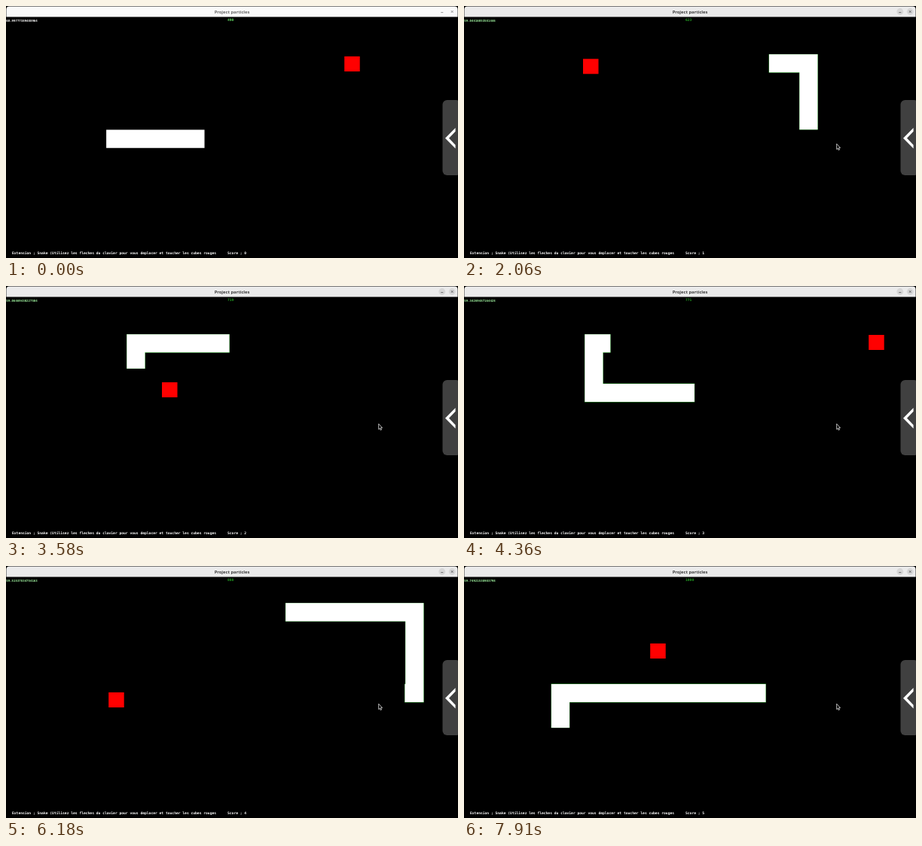
These frames come from a looping animation (600x335 px, 7990 ms). An HTML page with a canvas:

```html
<!DOCTYPE html>
<html lang="fr">
<head>
<meta charset="utf-8">
<title>Project particles</title>
<style>
html, body { margin: 0; width: 100%; height: 100%; overflow: hidden; background: #000; }
canvas { display: block; width: 600px; height: 335px; }
</style>
</head>
<body>
<canvas id="stage"></canvas>
<script>
const W = 600, H = 335, LOOP = 7990;
const STEP_MS = 79.1, STEPS = 101, SUB = 20;
const HALF = 12.2, CUBE_W = 20.5, CUBE_H = 20;
const START_LENGTH = 106, GROWTH = 1.5, GROWTH_WAIT = 4;
const FOCUS_STEP = 5;
const MONO = '"DejaVu Sans Mono", monospace';

const canvas = document.getElementById('stage');
const ctx = canvas.getContext('2d');
const ratio = window.devicePixelRatio || 1;
canvas.width = W * ratio;
canvas.height = H * ratio;

// One level per cube: where it lies and how far the snake moves per step
const LEVELS = [
  { x: 449.2, y: 67, speed: 13.2 },
  { x: 158, y: 70.3, speed: 14 },
  { x: 207, y: 128, speed: 14 },
  { x: 537.2, y: 65, speed: 18.95 },
  { x: 136.2, y: 168, speed: 19.2 },
  { x: 247.2, y: 103, speed: 29 },
];

// The snake turns alternately at an x and at a y
const START = [145.3, 176.6];
const TURNS = [457.4, 76.3, 172.4, 142, 343, 61.4, 542.3, 169, 128, 260];
const route = [START];
TURNS.forEach((turn, i) => {
  const [x, y] = route[i];
  route.push(i % 2 ? [x, turn] : [turn, y]);
});

// Part of the route between two distances
function section(from, to) {
  const points = [];
  let start = 0;
  for (let i = 1; i < route.length; i++) {
    const [ax, ay] = route[i - 1], [bx, by] = route[i];
    const len = Math.hypot(bx - ax, by - ay);
    const at = d => [ax + (bx - ax) * d / len, ay + (by - ay) * d / len];
    const a = Math.max(from - start, 0), b = Math.min(to - start, len);
    if (a < b) {
      if (!points.length) points.push(at(a));
      points.push(at(b));
    }
    start += len;
  }
  return points;
}

function touches([x, y], cube) {
  return x + HALF > cube.x && x - HALF < cube.x + CUBE_W &&
    y + HALF > cube.y && y - HALF < cube.y + CUBE_H;
}

// Play the game once: head distance at each substep, and when cubes are eaten
const heads = [], meals = [];
for (let i = 0, head = START_LENGTH; i <= STEPS * SUB; i++) {
  heads.push(head);
  if (meals.length < LEVELS.length - 1 &&
      touches(section(0, head).pop(), LEVELS[meals.length])) meals.push(i / SUB);
  head += LEVELS[meals.length].speed / SUB;
}

function headAt(step) {
  if (step <= 0) return START_LENGTH + step * LEVELS[0].speed;
  const i = Math.floor(step * SUB), rest = step * SUB - i;
  return heads[i] + (heads[i + 1] - heads[i]) * rest;
}

// The tail repeats the head's way later, and later still after each meal
function tailAt(step) {
  let lag = START_LENGTH / LEVELS[0].speed;
  for (const meal of meals) {
    lag += Math.min(GROWTH, Math.max(0, step - meal - GROWTH_WAIT));
  }
  return headAt(step - lag);
}

function rateText(step) {
  let seed = step * 7919 + 17, str = step ? '59.' : '60.';
  for (let i = 0; i < 14; i++) {
    seed = (seed * 16807) % 2147483647;
    str += seed % 10;
  }
  return str;
}

function text(str, x, y, font, color, align = 'left') {
  ctx.font = font;
  ctx.fillStyle = color;
  ctx.textAlign = align;
  ctx.fillText(str, x, y);
}

function line(points, color, width, cap = 'butt') {
  ctx.beginPath();
  points.forEach(([x, y]) => ctx.lineTo(x, y));
  ctx.strokeStyle = color;
  ctx.lineWidth = width;
  ctx.lineCap = cap;
  ctx.lineJoin = 'miter';
  ctx.stroke();
}

function polygon(points, color) {
  ctx.beginPath();
  points.forEach(([x, y]) => ctx.lineTo(x, y));
  ctx.closePath();
  ctx.fillStyle = color;
  ctx.fill();
}

function roundBox(x, y, w, h, radii, color) {
  ctx.beginPath();
  ctx.roundRect(x, y, w, h, radii);
  ctx.fillStyle = color;
  ctx.fill();
}

function drawTitleBar(focused) {
  roundBox(0.4, 0.5, W - 0.8, 14.1, [4, 4, 0, 0], focused ? '#ebebeb' : '#fafafa');
  const ink = focused ? '#3d3d3d' : '#6a6a6a';
  text('Project particles', 300, 9.9, 'bold 5.75px "Open Sans", sans-serif', ink, 'center');
  if (focused) {
    for (const x of [578.8, 592.2]) roundBox(x - 4.4, 3.1, 8.8, 8.8, 4.4, '#d6d6d6');
  }
  line([[577.3, 8.6], [580.3, 8.6]], ink, 0.7);
  line([[590.8, 6.1], [593.6, 8.9]], ink, 0.7);
  line([[593.6, 6.1], [590.8, 8.9]], ink, 0.7);
}

function drawSnake(step) {
  const body = section(tailAt(step), headAt(step));
  if (step > 0) line(body, '#2fa52f', HALF * 2 + 0.4, 'square');
  line(body, '#fff', HALF * 2 - (step > 0 ? 0.3 : 0), 'square');
}

function drawPanel() {
  roundBox(579.5, 125, 24, 100, 6, '#404040');
  polygon([[583, 175.8], [596.6, 162], [596.6, 166.8], [588, 175.8],
    [596.6, 184.8], [596.6, 189.4]], '#fff');
}

function drawCursor() {
  const arrow = [[494.7, 183.2], [494.7, 190.6], [496.3, 189.2], [497.3, 191.6],
    [498.5, 191], [497.5, 188.7], [499.5, 188.5], [494.7, 183.2]];
  polygon(arrow, '#000');
  line(arrow, '#e6e6e6', 0.8);
}

function draw(time) {
  const step = Math.floor(time / STEP_MS + 0.1);
  const score = meals.filter(meal => step >= meal).length;
  const focused = step >= FOCUS_STEP;
  const cube = LEVELS[score];

  ctx.setTransform(ratio, 0, 0, ratio, 0, 0);
  ctx.fillStyle = '#000';
  ctx.fillRect(0, 0, W, H);

  ctx.fillStyle = '#f00';
  ctx.fillRect(cube.x, cube.y, CUBE_W, CUBE_H);
  drawSnake(step);

  text(rateText(step), 0.3, 20.5, `bold 4.05px ${MONO}`, step < 25 ? '#fff' : '#a0f4a0');
  text(490 + Math.round(step * 5.1), 294, 20.4, `bold 4.65px ${MONO}`,
    step < 12 ? '#62d862' : '#229a22');
  const small = `bold 4.65px ${MONO}`;
  text('Extension ; Snake (Utilisez les fleches du clavier pour vous deplacer et toucher les cubes rouges',
    8, 329.8, small, '#fff');
  text('Score ; ' + score, 294, 329.8, small, '#fff');

  drawTitleBar(focused);
  drawPanel();
  if (focused) drawCursor();
}

const begin = performance.now();
function tick() {
  draw((performance.now() - begin) % LOOP);
  requestAnimationFrame(tick);
}
tick();
</script>
</body>
</html>
```
